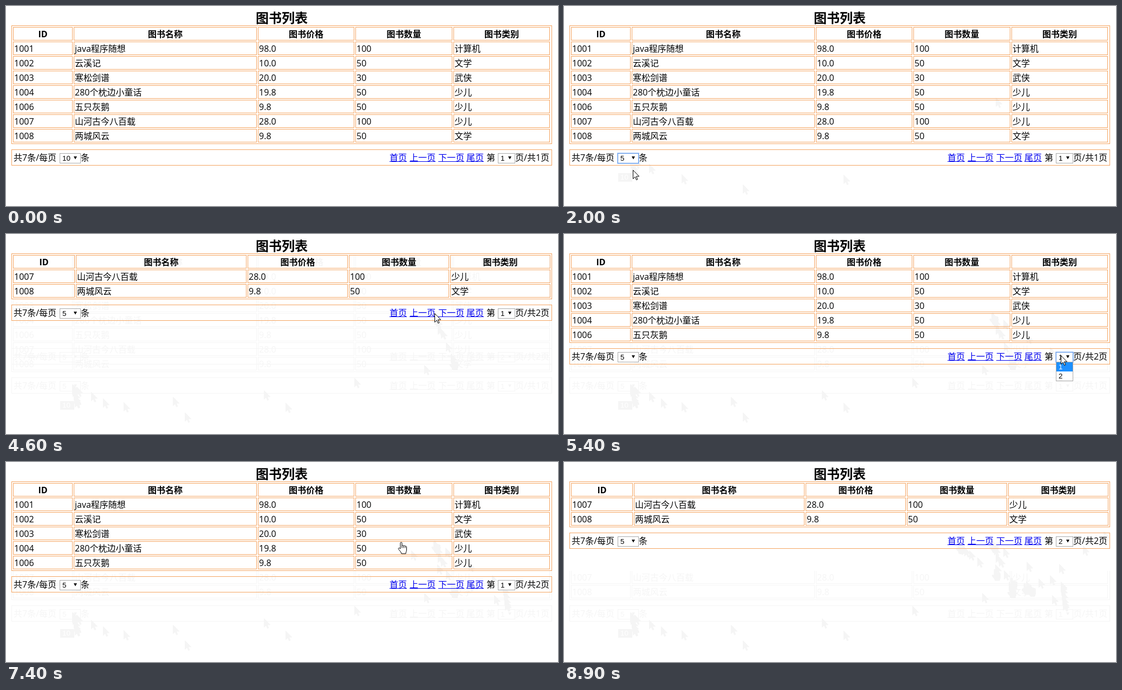
An HTML page with a canvas that plays this animation: 1019 px wide and 371 px high, repeating every 9.7 s.

```html
<!DOCTYPE html>
<html lang="zh-CN">
<head>
<meta charset="utf-8">
<title>图书列表</title>
<style>
  html, body { margin: 0; width: 100%; height: 100%; overflow: hidden; background: #fff; }
  canvas { display: block; }
</style>
</head>
<body>
<canvas id="stage" width="1019" height="371"></canvas>
<script>
const ctx = document.getElementById('stage').getContext('2d');
const LOOP = 9700, STEP = 100, ENTER = 200, LEAVE = 8900;
const FONT = '"Open Sans", "Noto Sans CJK SC", sans-serif';
const BORDER = '#f4a460', GHOST = '#f5f5f5';
const ROW = 27, GAP = 2, LINK_SPACE = 4.75;

const HEADERS = ['ID', '图书名称', '图书价格', '图书数量', '图书类别'];
const BOOKS = [
  ['1001', 'java程序随想', '98.0', '100', '计算机'],
  ['1002', '云溪记', '10.0', '50', '文学'],
  ['1003', '寒松剑谱', '20.0', '30', '武侠'],
  ['1004', '280个枕边小童话', '19.8', '50', '少儿'],
  ['1006', '五只灰鹅', '9.8', '50', '少儿'],
  ['1007', '山河古今八百载', '28.0', '100', '少儿'],
  ['1008', '两城风云', '9.8', '50', '文学']
];

// The last three columns share what the first two leave over
function columns(idWidth, nameWidth) {
  const rest = (984 - idWidth - nameWidth) / 3;
  let x = 13;
  return [idWidth, nameWidth, rest, rest, rest].map(width => {
    const left = Math.floor(x);
    x += width + GAP;
    return { left, width: Math.floor(x) - GAP - left };
  });
}
const LAYOUTS = {
  all: { rows: BOOKS, cols: columns(110, 338) },
  first: { rows: BOOKS.slice(0, 5), cols: columns(110, 338) },
  last: { rows: BOOKS.slice(5), cols: columns(114, 315) }
};

const RESIZE = 2000;                               // page size becomes 5
const FLIPS = [3500, 4600, 6100, 7300, 8200];      // page number toggles
const HOVERS = [[3200, 3500], [4200, 4600], [7000, 7500], [7700, 8500]];

const easeOut = k => 1 - (1 - k) ** 3.5;
const easeInOut = k => k * k * (3 - 2 * k);
const move = (start, end, x, y, bend = 0, ease = easeInOut) => ({ start, end, x, y, bend, ease });
const MOVES = [
  move(ENTER, 900, 122, 279, 200, easeOut),
  move(1100, 1700, 127, 304),
  move(2200, 2800, 824, 231, 45),
  move(3600, 4100, 791, 147),
  move(4700, 5100, 917, 222),
  move(5300, 5900, 921, 258),
  move(6300, 6800, 728, 153),
  move(6900, 7000, 729, 149),
  move(7400, 8000, 860, 228, 20),
  move(8400, LEAVE, 1012, 116)
];
const ARROW = new Path2D('M.5.5V16.6L4.2 13l2.5 5.6 2.2-1L6.4 12H11.6Z');
const HAND = new Path2D('M5 13V2.5a1.5 1.5 0 0 1 3 0V7.5a1.6 1.6 0 0 1 3 .4 1.6 1.6 0 0 1 3 .6 ' +
  '1.5 1.5 0 0 1 2.5 1.3V15c0 3-1.5 4-1.5 7H7c-.5-3-3-5-5.5-8.5-.8-2 1.5-3 3.5-.5Z');
const KNUCKLES = new Path2D('M8 7.5v4M11 8v3.5M14 9v2.5');

const between = (t, from, to) => t >= from && t < to;
const pageAt = t => 1 + FLIPS.filter(flip => flip <= t).length % 2;

// A table reload follows each change of the selects by one step
function layoutAt(t) {
  if (t < RESIZE + STEP) return 'all';
  return pageAt(t - STEP) === 1 ? 'first' : 'last';
}

function text(str, x, y, color, font = '16px ' + FONT, align = 'left') {
  ctx.font = font;
  ctx.textAlign = align;
  ctx.fillStyle = color;
  ctx.fillText(str, x, y);
}

function box(x, y, w, h, color) {
  ctx.strokeStyle = color;
  ctx.lineWidth = 1;
  ctx.strokeRect(x + .5, y + .5, w - 1, h - 1);
}

function fill(x, y, w, h, color) {
  ctx.fillStyle = color;
  ctx.fillRect(x, y, w, h);
}

const optionText = (str, x, y, color) =>
  text(str, x, y, color, '13.333px "Liberation Sans", Arial, sans-serif');

function select(x, y, w, value, focused, ghost) {
  if (!ghost) fill(x, y, w, 19, '#fff');
  if (focused) box(x - 1, y - 1, w + 2, 21, '#b4d0fa');
  box(x, y, w, 19, ghost || (focused ? '#5f97e8' : '#a9a9a9'));
  optionText(value, x + 5, y + 14, ghost || '#000');
  const ax = x + w - 13, ay = y + 6;
  ctx.beginPath();
  ctx.moveTo(ax, ay);
  ctx.lineTo(ax + 6, ay);
  ctx.lineTo(ax + 3, ay + 5.5);
  ctx.fill();
}

function optionList(x, y, w, options, active) {
  const h = options.length * 17 + 2;
  fill(x, y, w, h, '#fff');
  box(x, y, w, h, '#a9a9a9');
  options.forEach((option, i) => {
    const top = y + 1 + i * 17;
    if (i === active) fill(x + 1, top, w - 2, 17, '#1e90ff');
    optionText(option, x + 5, top + 13, i === active ? '#fff' : '#000');
  });
}

const pagerTop = layout => 77 + ROW * LAYOUTS[layout].rows.length;

function drawTable(layout, ghost) {
  const { rows, cols } = LAYOUTS[layout];
  const border = ghost || BORDER, ink = ghost || '#000';
  box(10, 36, 998, pagerTop(layout) - 46, border);
  [HEADERS, ...rows].forEach((row, r) => row.forEach((cell, c) => {
    const { left, width } = cols[c], y = 39 + ROW * r;
    box(left, y, width, ROW - GAP, border);
    if (r) text(cell, left + 2, y + 19, ink);
    else text(cell, left + width / 2, y + 19, ink, 'bold 16px ' + FONT, 'center');
  }));
}

function drawPager({ layout, size, page, pages, focus }, ghost) {
  const y = pagerTop(layout), base = y + 21, ink = ghost || '#000';
  box(10, y, 998, 30, ghost || BORDER);
  text('共7条/每页', 14, base, ink);
  select(99, y + 7, 39, size, focus === 'size', ghost);
  text('条', 138, base, ink);
  let x = 708;
  for (const label of ['首页', '上一页', '下一页', '尾页']) {
    const left = Math.round(x), width = label.length * 16;
    text(label, left, base, ghost || '#0000ee');
    ctx.fillRect(left, base + 1, width, 1);
    x += width + LINK_SPACE;
  }
  text('第', x, base, ink);
  select(908, y + 7, 32, page, focus === 'page', ghost);
  text(`页/共${pages}页`, 940, base, ink);
}

function pointerAt(t) {
  let x = 797, y = 170;
  for (const m of MOVES) {
    if (t <= m.start) break;
    const k = m.ease(Math.min(1, (t - m.start) / (m.end - m.start)));
    x += (m.x - x) * k;
    y += (m.y - y) * k + 2 * m.bend * k * (1 - k);
  }
  return [Math.round(x), Math.round(y)];
}

function drawPointer(t, ghost) {
  const [x, y] = pointerAt(t);
  const hand = HOVERS.some(([from, to]) => between(t, from, to));
  const shape = hand ? HAND : ARROW;
  ctx.save();
  ctx.translate(hand ? x - 6 : x, hand ? y - 1 : y);
  ctx.fillStyle = ghost || '#fff';
  ctx.strokeStyle = ghost || '#000';
  ctx.lineWidth = 1;
  ctx.fill(shape);
  ctx.stroke(shape);
  if (hand) ctx.stroke(KNUCKLES);
  ctx.restore();
}

// Faint traces left behind by earlier views and pointer positions
function drawTraces(t) {
  if (t >= RESIZE + STEP) {
    const showAll = between(t, FLIPS[0] + STEP, FLIPS[1] + STEP);
    ctx.save();
    ctx.beginPath();
    ctx.rect(0, showAll ? 0 : 202, 1019, 371);
    ctx.clip();
    drawTable('all', GHOST);
    drawPager({ layout: 'all', size: '5', page: 1, pages: 1 }, GHOST);
    if (showAll) drawPager({ layout: 'first', size: '5', page: 2, pages: 2 }, GHOST);
    ctx.restore();
  }
  if (t >= RESIZE) {
    fill(100, 310, 26, 16, GHOST);
    optionText('10', 104, 322, '#fff');
  }
  for (let past = ENTER; past < Math.min(t, LEAVE); past += STEP) drawPointer(past, GHOST);
}

function draw(t) {
  const layout = layoutAt(t);
  const listTop = pagerTop(layout) + 25;
  fill(0, 0, 1019, 371, '#fff');
  drawTraces(t);
  text('图书列表', 509, 31, '#000', 'bold 24px ' + FONT, 'center');
  drawTable(layout);
  drawPager({
    layout,
    size: t < RESIZE ? '10' : '5',
    page: pageAt(t),
    pages: layout === 'all' ? 1 : 2,
    focus: between(t, 1100, 2100) ? 'size' : between(t, 5200, 6200) ? 'page' : ''
  });
  if (between(t, 1100, RESIZE)) optionList(99, listTop, 39, ['5', '10', '20', '50'], t < 1500 ? 1 : 0);
  if (between(t, 5300, FLIPS[2])) optionList(908, listTop, 32, ['1', '2'], t < 5800 ? 0 : 1);
  if (between(t, ENTER, LEAVE)) drawPointer(t);
}

function tick() {
  const t = performance.now() % LOOP;
  draw(Math.floor(t / STEP) * STEP);
  requestAnimationFrame(tick);
}
tick();
</script>
</body>
</html>
```
